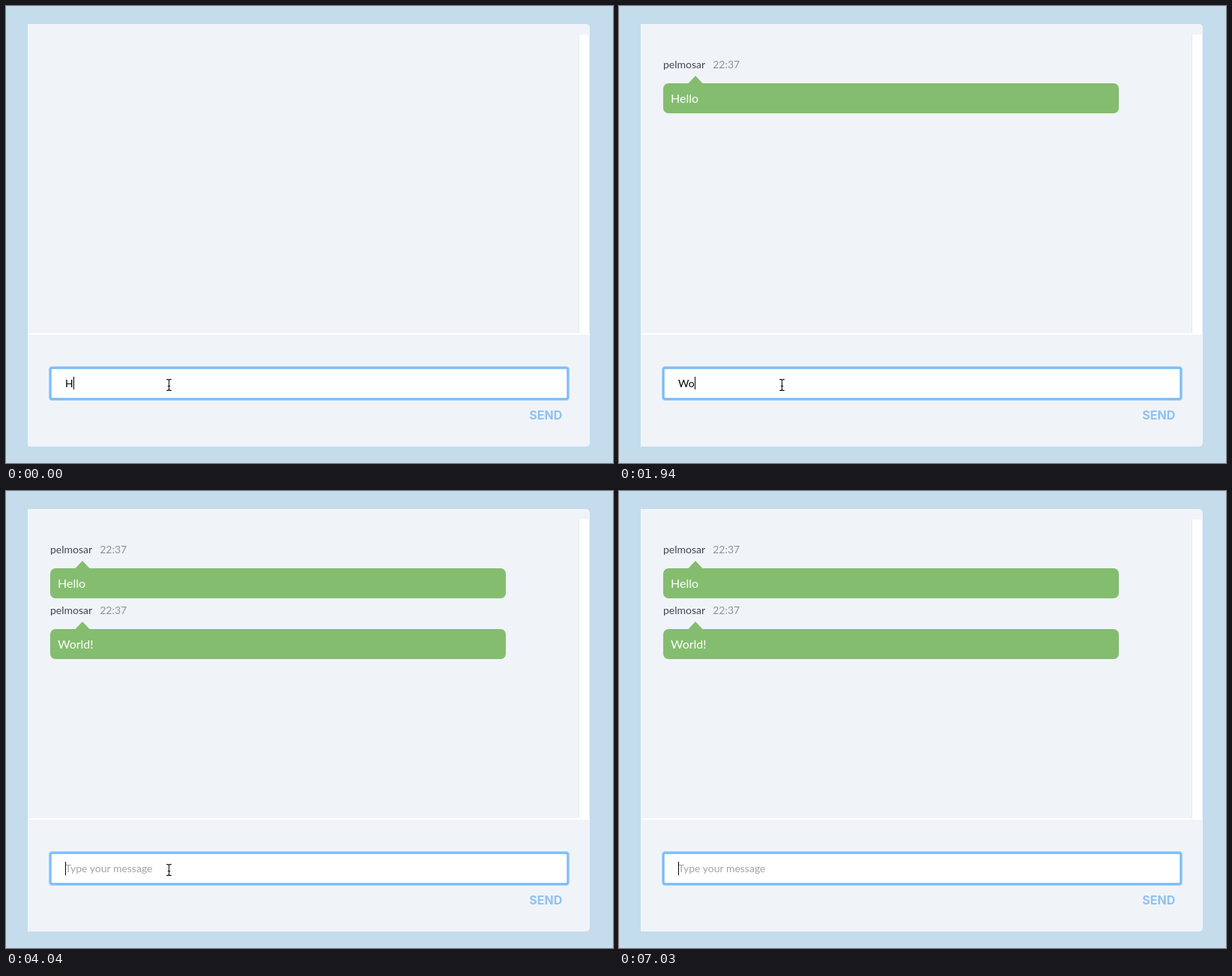
Recreate the animation shown at these times as an HTML page. Size 810 px wide and 609 px high, loop 7.17 s.

```html
<!DOCTYPE html>
<html lang="en">
<head>
<meta charset="utf-8">
<title>Chat</title>
<style>
  html, body { margin: 0; width: 100%; height: 100%; overflow: hidden; background: #c4dceb; }
  svg { display: block; width: 810px; height: 609px; font: 14px Lato, sans-serif; }
  .name { fill: #434651; }
  .time { fill: #8f9297; }
  .bubble { fill: #84bd6f; }
  .body { font-size: 16px; fill: #fff; }
  .send { font: bold 16px Inter, sans-serif; fill: #90c1f2; }
  .hint { fill: #a3a3a3; }
</style>
</head>
<body>
<svg viewBox="0 0 810 609">
  <defs>
    <g id="frame">
      <text class="name" x="59" y="83">pelmosar</text>
      <text class="time" x="125.2" y="83">22:37</text>
      <rect class="bubble" x="59" y="103" width="608" height="40" rx="7"/>
      <path class="bubble" d="M92 103.5 102 93l10 10.5z"/>
    </g>
  </defs>

  <path fill="#f0f4f9" d="M29 24H774a5 5 0 0 1 5 5V582a5 5 0 0 1-5 5H29z"/>
  <rect x="764" y="38" width="14" height="398" fill="#fff"/>
  <rect x="764" y="38" width="1" height="398" fill="#e7e8ea"/>
  <rect x="778" y="38" width="1" height="398" fill="#eef0f2"/>
  <rect x="29" y="436" width="750" height="2" fill="#fff"/>

  <g id="first"><use href="#frame"/><text class="body" x="69" y="129">Hello</text></g>
  <g id="second" transform="translate(0 81)"><use href="#frame"/><text class="body" x="69" y="129">World!</text></g>

  <rect x="59" y="482" width="691" height="42" rx="2.5" fill="#fff" stroke="#a5d1fb" stroke-width="4"/>
  <rect x="59.5" y="482.5" width="690" height="41" rx="2" fill="#fff" stroke="#78bafa" stroke-width="2.4"/>
  <text class="hint" id="hint" x="79" y="508">Type your message</text>
  <text id="typed" x="79" y="508"></text>
  <rect id="caret" y="494" width="1"/>
  <text class="send" x="698.3" y="551">SEND</text>

  <path id="beam" fill="none" stroke="#111" stroke-width="1.1"
    d="M-3.3-7.4h1.6q1.7 0 1.7 1.6V5.8q0 1.6-1.7 1.6h-1.6M3.3-7.4h-1.6q-1.7 0-1.7 1.6V5.8q0 1.6 1.7 1.6h1.6M-1.7 1.5h3.4"/>
  <path id="arrow" stroke="#fff" stroke-width="1.1" stroke-linejoin="round"
    d="M0 0V14.6L3.3 11.5 5.4 16.3 7.9 15.2 5.8 10.6H10.6z"/>
</svg>
<script>
  const LOOP = 7170;
  const $ = id => document.getElementById(id);

  // [start ms, input text, caret x (0 = hidden)]
  const typing = [
    [0, "H", 90], [150, "He", 100], [300, "Hel", 104], [450, "Hello", 112], [1050, "Hello", 0],
    [1190, "", 79], [1790, "W", 93], [1940, "Wo", 101], [2090, "Wor", 107], [2240, "Worl", 110],
    [2540, "World", 118], [2990, "World", 0], [3440, "World!", 121], [3890, "World!", 0],
    [4040, "", 79], [4490, "", 0], [5080, "", 79], [5530, "", 0],
    [5980, "", 79], [6580, "", 0], [7030, "", 79]
  ];

  // [start ms, pointer shape, x, y]
  const pointer = [
    [0, "beam", 217.5, 505], [4790, "beam", 230.5, 505],
    [4930, "arrow", 436.5, 572.5], [5080, "arrow", 474.5, 585.5], [5380, "", 0, 0]
  ];

  const current = (steps, t) => steps.filter(step => step[0] <= t).pop();
  const show = (el, on) => el.setAttribute("visibility", on ? "visible" : "hidden");

  function draw(now) {
    const t = now % LOOP;
    const [, text, caretX] = current(typing, t);
    const [, shape, x, y] = current(pointer, t);

    $("typed").textContent = text;
    show($("hint"), !text);
    show($("first"), t >= 1190);
    show($("second"), t >= 4040);

    show($("caret"), caretX);
    $("caret").setAttribute("x", caretX);
    $("caret").setAttribute("height", text ? 17 : 18);

    for (const id of ["beam", "arrow"]) {
      show($(id), id === shape);
      $(id).setAttribute("transform", `translate(${x} ${y})`);
    }
  }

  function tick(now) {
    draw(now);
    requestAnimationFrame(tick);
  }
  draw(0);
  requestAnimationFrame(tick);
</script>
</body>
</html>
```
